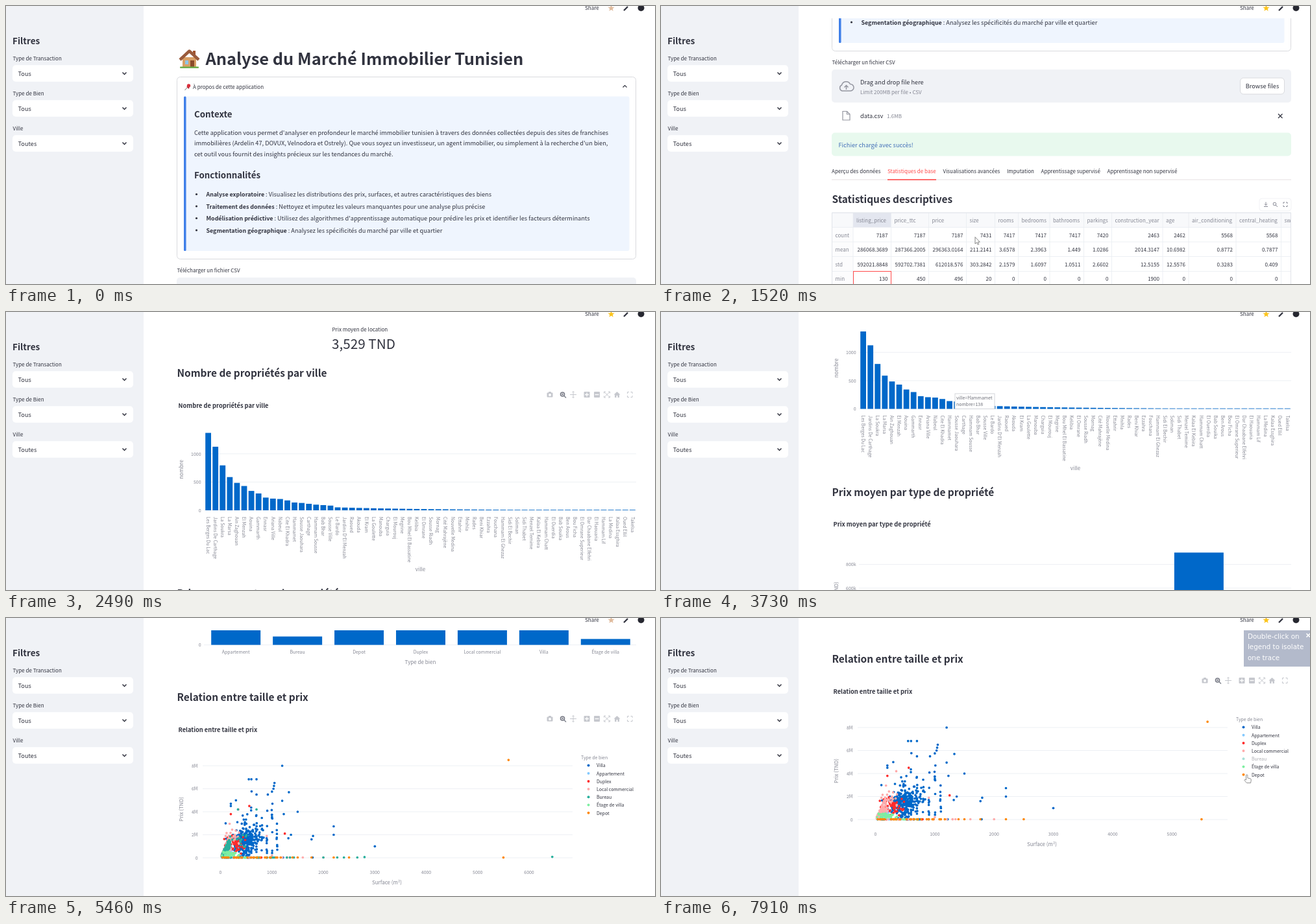
Animation of 1000x429 px, one loop 7990 ms. Source, as an HTML page:

```html
<!DOCTYPE html>
<html lang="fr">
<head>
<meta charset="utf-8">
<title>Analyse immobilière</title>
<style>
html, body { margin: 0; width: 100%; height: 100%; overflow: hidden; background: #fff; }
svg { display: block; width: 1000px; height: 429px; }
text { font-family: "Noto Sans CJK JP", "Noto Sans CJK SC", "Noto Sans CJK KR", "Noto Sans CJK", "Open Sans", sans-serif; white-space: pre; }
.b { font-weight: 700; }
.m { text-anchor: middle; }
.e { text-anchor: end; }
</style>
</head>
<body>
<svg id="stage" viewBox="0 0 1000 429"></svg>
<script>
const LOOP = 7990;
const INK = '#31333f', GREY = '#868894', PALE = '#f0f2f6', BLUE = '#0068c9', RED = '#ff4b4b';
const BODY = 9.21, LABEL = 8.06, TICK = 6.94, HEAD = 15.42, TITLE = 9.28;

// y is the middle of the capital letters
const text = (x, y, s, size = BODY, fill = INK, cls = '', more = '') =>
  `<text x="${x}" y="${(y + size * .36 + .3).toFixed(2)}" font-size="${size}" fill="${fill}" class="${cls}" ${more}>${s}</text>`;
const rect = (x, y, w, h, fill, rx = 0, stroke = 'none') =>
  `<rect x="${x}" y="${y}" width="${w}" height="${h}" fill="${fill}" rx="${rx}" stroke="${stroke}"/>`;
const line = (d, stroke = INK, w = 1, more = '') =>
  `<path d="${d}" fill="none" stroke="${stroke}" stroke-width="${w}" ${more}/>`;
const dot = (x, y, r, fill, more = '') => `<circle cx="${x}" cy="${y}" r="${r}" fill="${fill}" ${more}/>`;
const group = (y, body, id = '') => `<g id="${id}" transform="translate(0 ${y})">${body}</g>`;
const turned = (x, y, s, size, angle, cls = 'm') =>
  `<g transform="translate(${x} ${y}) rotate(${angle})">${text(0, 0, s, size, GREY, cls)}</g>`;
const grid = (x1, x2, y) => line(`M${x1} ${y}H${x2}`, '#e9ecf1', .8);

let seed = 7;
const rnd = () => (seed = seed * 16807 % 2147483647) / 2147483647;
const gauss = () => rnd() + rnd() + rnd() + rnd() - 2;
const times = (n, f) => Array.from({ length: n }, (_, i) => f(i));

function modebar(y, id = '') {
  const c = '#c6c8ce';
  const box = (x, sign) => rect(x - 4.5, -4.5, 9, 9, c, 1) + line(sign, '#fff', 1.3);
  return group(y,
    rect(833.5, -3, 9, 7, c, 1) + rect(836, -4.5, 4, 2, c) + dot(838, .5, 2, '#fff') +
    dot(857.5, -.5, 3, 'none', 'stroke="#777a85" stroke-width="1.6"') +
    line('M856 -.5h3M857.5 -2v3M860 2l3 3', '#777a85', 1.2) +
    line('M869 0h10M874 -5v10M872.5 -3.5l1.5 -1.5 1.5 1.5M872.5 3.5l1.5 1.5 1.5 -1.5', c) +
    box(895, 'M892 0h6M895 -3v6') + box(910.5, 'M907.5 0h6') +
    line('M922 -4l8 8M930 -4l-8 8M921.5 -2v-2.5h2.5M928 -4.5h2.5v2.5M921.5 2v2.5h2.5M928 4.5h2.5v-2.5', c) +
    `<path d="M936.5 0l5 -4.5 5 4.5h-1.5v4.5h-2.5v-3h-2v3H938V0z" fill="${c}"/>` +
    line('M957.5 -1.5v-2.5h2.5M962.5 -4h2.5v2.5M957.5 1.5V4h2.5M962.5 4h2.5V1.5', c), id);
}

function sidebar() {
  const select = (y, label, value) => text(10.5, y - 23, label, LABEL) +
    rect(10, y - 12.7, 186, 25.4, '#fff', 5) + text(18.5, y, value) +
    line(`M179.5 ${y - 1.5}l3 3 3 -3`, INK, 1.5);
  return rect(0, 0, 212, 429, PALE) + text(10, 53.5, 'Filtres', 13.5, INK, 'b') +
    select(104, 'Type de Transaction', 'Tous') + select(158, 'Type de Bien', 'Tous') +
    select(212, 'Ville', 'Toutes');
}

function header() {
  const star = times(10, i => {
    const a = i * Math.PI / 5, r = i % 2 ? 2.3 : 5.3;
    return `${932.5 + r * Math.sin(a)},${3.5 - r * Math.cos(a)}`;
  }).join(' ');
  return rect(212, 0, 788, 19, '#fff') + text(892, 3.2, 'Share', LABEL) +
    `<polygon id="star" points="${star}"/>` +
    line('M952 7l6 -6', INK, 2.3) + dot(978.5, 3, 5, '#262730');
}

function intro() {
  const item = (y, head, rest) => dot(293.5, y, 1.6, INK) +
    text(308.5, y, `<tspan class="b" font-size="8.9">${head}</tspan> : ${rest}`);
  const house = rect(272, 79, 21, 16, '#d9a066') + rect(288, 69, 4, 9, '#a0522d') +
    line('M268 83L282.5 69.5L297 83', '#9a5b3c', 4.5, 'stroke-linejoin="round"') +
    rect(276, 84, 5, 6, '#8ec5e8') + rect(284, 84, 6, 11, '#8a4b2a') + rect(268, 93.5, 29, 2.5, '#6fae4e', 1);
  const pin = line('M279 126l-3.5 4', '#777', 1) + line('M279 124l3 3', '#b3202c', 2) +
    dot(281.5, 123, 2.7, '#d8303c');
  return house + text(307.5, 82, 'Analyse du Marché Immobilier Tunisien', 25.4, INK, 'b') +
    rect(263.5, 109.5, 707, 281, '#fff', 5, '#d9dade') + pin +
    text(288, 125, 'À propos de cette application', LABEL) + line('M950.5 125.5l3 -3 3 3', INK, 1.2) +
    rect(274, 139.5, 686.5, 238.5, '#eff5fe', 3) + rect(274, 139.5, 3.5, 238.5, '#3f7fe8', 1.5) +
    text(290, 166.5, 'Contexte', 13.3, INK, 'b') +
    text(290, 195, "Cette application vous permet d'analyser en profondeur le marché immobilier tunisien à travers des données collectées depuis des sites de franchises") +
    text(290, 211.5, "immobilières (Ardelin 47, DOVUX, Velnodora et Ostrely). Que vous soyez un investisseur, un agent immobilier, ou simplement à la recherche d'un bien,") +
    text(290, 228, 'cet outil vous fournit des insights précieux sur les tendances du marché.') +
    text(290, 260.5, 'Fonctionnalités', 13.3, INK, 'b') +
    item(290.5, 'Analyse exploratoire', 'Visualisez les distributions des prix, surfaces, et autres caractéristiques des biens') +
    item(309, 'Traitement des données', 'Nettoyez et imputez les valeurs manquantes pour une analyse plus précise') +
    item(327.5, 'Modélisation prédictive', "Utilisez des algorithmes d'apprentissage automatique pour prédire les prix et identifier les facteurs déterminants") +
    item(346, 'Segmentation géographique', 'Analysez les spécificités du marché par ville et quartier');
}

function uploader() {
  const tabs = [[263, 'Aperçu des données'], [349, 'Statistiques de base'], [434.5, 'Visualisations avancées'],
    [533, 'Imputation'], [585.5, 'Apprentissage supervisé'], [687.5, 'Apprentissage non supervisé']];
  return text(263.5, 87, 'Télécharger un fichier CSV', LABEL) + rect(263, 98, 708, 51, PALE, 5) +
    line('M279 131a4.8 4.8 0 0 1 -.5 -9a7 7 0 0 1 13 -1.5a5 5 0 0 1 .5 10.5z', '#9496a0', 1.5) +
    line('M285.5 129v-6M282.5 125.5l3 -3 3 3', '#9496a0', 1.5) +
    text(307, 117, 'Drag and drop file here') + text(307, 133, 'Limit 200MB per file • CSV', LABEL, GREY) +
    rect(892.5, 111, 68, 25, '#fff', 5, '#d9dade') + text(926.5, 123.5, 'Browse files', BODY, INK, 'm') +
    line('M280 162.5h6.5l4.5 4.5v9h-11zM286.5 162.5v4.5h4.5', '#9496a0', 1.2) +
    text(307, 169.5, 'data.csv') + text(348, 169.5, '1.6MB', LABEL, GREY) +
    line('M951 166.5l6.5 6.5M957.5 166.5l-6.5 6.5', INK, 1.2) +
    rect(263, 195.5, 708, 36, '#e8f9ee', 5) + text(273.5, 214, 'Fichier chargé avec succès!', BODY, '#4470b8') +
    tabs.map(([x, s], i) => text(x, 255, s, LABEL, INK, '', `id="tab${i}"`)).join('') +
    line('M263 268H971', '#e6dfe2', 1) + rect(349, 267.2, 75, 1.6, RED).replace('<rect', '<rect id="mark"');
}

function stats() {
  const cols = [
    [296, 'listing_price', '7187 286068.3689 592021.8848 130'], [354.5, 'price_ttc', '7187 287366.2005 592702.7381 450'],
    [412.5, 'price', '7187 296363.0164 612018.576 496'], [470.5, 'size', '7431 211.2141 303.2842 20'],
    [514.5, 'rooms', '7417 3.6578 2.1579 0'], [550.5, 'bedrooms', '7417 2.3963 1.6097 0'],
    [599, 'bathrooms', '7417 1.449 1.0511 0'], [651.5, 'parkings', '7420 1.0286 2.6602 0'],
    [694.5, 'construction_year', '2463 2014.3147 12.5155 1900'], [773, 'age', '2462 10.6982 12.5576 0'],
    [813, 'air_conditioning', '5568 0.8772 0.3283 0'], [886, 'central_heating', '5568 0.7877 0.409 0'], [955.5, 'sw', '']];
  const rowY = i => 353.5 + 22.5 * i;
  let s = text(263.5, 298, 'Statistiques descriptives', HEAD, INK, 'b') +
    rect(263, 319, 708, 22.5, '#f8f9fb') + rect(263, 341, 33, 90, '#fcfcfd') + rect(296, 319, 58.5, 22.5, '#e3e6ef');
  for (const y of [319, 341.5, 364, 386.5, 409.5, 432]) s += grid(263, 971, y);
  cols.forEach(([x, name, vals], i) => {
    s += line(`M${x} 319V432`, '#e9ecf1', .8) + text(x + 5, 330.5, name, LABEL, GREY);
    if (vals) vals.split(' ').forEach((v, r) => s += text(cols[i + 1][0] - 5, rowY(r), v, LABEL, INK, 'e'));
  });
  ['count', 'mean', 'std', 'min'].forEach((v, r) => s += text(268.5, rowY(r), v, LABEL, GREY));
  return s + line('M263.5 432V319H970.5V432', '#e1e4ea') + rect(296.5, 409.5, 58, 22.5, 'none', 0, RED) +
    rect(922, 297, 49, 19, '#fff', 4, '#f1f2f5') +
    line('M932 302.5v5M930 305.5l2 2 2 -2M929 309.5h6', GREY) +
    dot(945.5, 305.5, 2.3, 'none', `stroke="${GREY}"`) + line('M947 307l3 3', GREY) +
    line('M959 305v-2h2M963 303h2v2M959 307.5v2h2M963 309.5h2v-2', GREY);
}

function cities() {
  const names = "Les Berges Du Lac,Jardins De Carthage,La Soukra,La Marsa,Ain Zaghouan,El Menzah,Aouina,Gammarth,Ennasr,Ariana Ville,Nabeul,Cite El Khadra,Hammamet,Sousse Jaouhara,Carthage,Hammam Sousse,Bab Bhar,Sousse Ville,Le Bardo,Jardins D'El Menzah,Raoued,Akouda,El Kram,La Goulette,Manouba,Charguia,El Mourouj,Megrine,Bou Mhel El Bassatine,Kelibia,El Omrane,Sousse Riadh,Mornag,Cité Mahrajène,Nouvelle Medina,Ettahrir,Mnihla,Rades,Beni Khiar,Ezzahra,Fouchana,Hammam El Ghezaz,Sidi El Bechir,Soliman,Sidi Thabet,Menzel Temime,Kalaa El Kebira,Hammam Chatt,El Ouerdia,Bab Souika,Ben Arous,Bou Ficha,El Omrane Superieur,Dar Chaabane Elfehri,El Haouaria,Hammam Lif,La Medina,Kalaa Essghira,Oued Ellil,Takelsa".split(',');
  const top = [1370, 1125, 795, 588, 485, 430, 343, 298, 225, 207, 200, 175, 138, 130, 115, 100, 92, 83];
  let s = text(502.5, 26.5, 'Prix moyen de location', LABEL) + text(502, 49, '3,529 TND', 20.7) +
    text(263.5, 94.5, 'Nombre de propriétés par ville', HEAD, INK, 'b') + modebar(127.5) +
    text(265.5, 144.5, 'Nombre de propriétés par ville', TITLE, INK, 'b');
  [0, 500, 1000].forEach(v => {
    const y = 306 - v * .0872;
    s += grid(305, 971, y) + text(300.5, y, v, TICK, GREY, 'e');
  });
  names.forEach((name, i) => {
    const x = 311.6 + i * 11.08, h = Math.max(.8, (top[i] || 52 * Math.exp((18 - i) / 14)) * .0872);
    s += rect(x - 4.4, 306 - h, 8.8, h, BLUE) + turned(x, 316, name, TICK, 90, '');
  });
  return s + turned(270, 243, 'nombre', LABEL, -90) + text(638.5, 397, 'ville', LABEL, GREY, 'm') +
    `<g id="tip">${rect(453, 282.5, 61, 23.5, '#fff', 0, '#d3d5da')}${text(455, 289, 'ville=Hammamet', TICK, '#6d6f78')}${text(455, 299, 'nombre=138', TICK, '#6d6f78')}</g>`;
}

function types() {
  const bars = [['Appartement', 300], ['Bureau', 71], ['Depot', 450], ['Duplex', 550], ['Local commercial', 400], ['Villa', 900], ['Étage de villa', 50]];
  let s = text(263.5, 278, 'Prix moyen par type de propriété', HEAD, INK, 'b') + modebar(311, 'bar2') +
    text(265.5, 327.5, 'Prix moyen par type de propriété', TITLE, INK, 'b');
  for (let v = 0; v <= 800; v += 200) {
    const y = 535.5 - v * .1825;
    s += grid(305, 971, y) + text(300.5, y, v ? v + 'k' : '0', TICK, GREY, 'e');
  }
  bars.forEach(([name, v], i) => {
    const x = 354.2 + i * 94.93, h = v * .1825;
    s += rect(x - 38, 535.5 - h, 76, h, BLUE) + text(x, 546.5, name, TICK, GREY, 'm');
  });
  return s + turned(270, 449, 'Prix moyen (TND)', LABEL, -90) + text(638.5, 562, 'Type de bien', LABEL, GREY, 'm');
}

// Scatter traces: points are [surface, price in millions]
const floor = (n, max) => times(n, () => [20 + rnd() * max, .02]);
const rising = (n, max, slope) => times(n, () => { const x = 20 + rnd() * max; return [x, x * slope * (.4 + rnd())]; });
const cloud = (n, x, dx, y, dy) => times(n, () => [x + dx * gauss(), Math.max(.1, y + dy * gauss())]);
const onBottom = xs => xs.map(x => [x, .03]);
const traces = [
  { name: 'Villa', color: BLUE, dull: '#7b7b82', pts: [
    ...cloud(190, 470, 150, 1.3, .8), ...cloud(80, 500, 270, 1.9, 1.4),
    ...[500, 600, 700, 800, 900, 1000, 1100].flatMap(x => times(9, () => [x + 8 * gauss(), .4 + 4 * rnd() ** 1.6])),
    ...floor(14, 1300), [1200, 8], [550, 6.83], [600, 6.83], [700, 6.83], [605, 5.77], [1050, 6.5], [1040, 6.25],
    [1030, 6], [1000, 5.75], [920, 5.5], [700, 5.5], [1330, 5.7], [1200, 4.95], [1500, 4], [1230, 3.8], [1010, 4.7],
    [300, 5], [200, 4.7], [200, 4.5], [2200, 2.73], [2200, 2], [1800, 1.9], [1770, 1.6], [1370, 2], [1320, 1.7], [3000, 1], [1790, .02], [100, 3]] },
  { name: 'Appartement', color: '#83c9ff', dull: '#b5c7dd', pts: [...rising(60, 200, .004), ...floor(8, 600)] },
  { name: 'Duplex', color: '#ff2b2b', dull: '#857277', pts: [...cloud(60, 270, 140, 1.25, .75), ...floor(6, 800), [560, 4.5], [200, 3.8], [1250, 2.1]] },
  { name: 'Local commercial', color: '#ffabab', dull: '#c9a3ad', pts: [...rising(85, 180, .0085), ...cloud(16, 220, 110, 2, .8), ...floor(12, 1300), [900, 1.9], [350, 4.2], [1000, .2], ...onBottom([1350, 1600, 2000])] },
  { name: 'Bureau', color: '#29b09d', dull: '#94a9c4', pts: [...rising(75, 170, .0075), ...cloud(12, 400, 130, 1.4, .6), ...floor(22, 1500), [340, 4.2], [700, 4.2], ...onBottom([2000, 2270, 2400, 2660]), [2800, .06], [6450, .08]] },
  { name: 'Étage de villa', color: '#7defa1', dull: '#e3e8ea', pts: [...cloud(45, 170, 120, .33, .22), ...floor(8, 700)] },
  { name: 'Depot', color: '#ff8700', dull: '#82868f', pts: [...floor(30, 1150), ...onBottom([1400, 1500, 1770, 2200, 2500]), [5500, .02], [5600, 8.5]] }];

function scatter() {
  let s = text(263.5, 63.5, 'Relation entre taille et prix', HEAD, INK, 'b') + modebar(96.5) +
    text(265.5, 113.5, 'Relation entre taille et prix', TITLE, INK, 'b');
  for (let v = 0; v <= 8; v += 2) {
    const y = 311 - v * 17.75;
    s += grid(303, 873, y) + text(295.5, y, v ? v + 'M' : '0', TICK, GREY, 'e');
  }
  s += times(7, i => text(0, 333, i * 1000, TICK, GREY, 'm', `id="x${i}"`)).join('');
  traces.forEach((t, i) => {
    for (const id of ['near', 'far'])
      s += `<path id="${id}${i}" fill="none" stroke-width="3.7" stroke-linecap="round"/>`;
  });
  traces.forEach((t, i) => {
    const y = 168.5 + i * 12.2;
    s += `<g id="key${i}">${dot(897.5, y, 2, t.color)}${text(910, y, t.name, TICK)}</g>`;
  });
  return s + text(886, 156.5, 'Type de bien', TICK, GREY) +
    turned(269.5, 236, 'Prix (TND)', LABEL, -90) + text(587, 348.5, 'Surface (m²)', LABEL, GREY, 'm');
}

const note = ['Double-click on', 'legend to isolate', 'one trace'].map((s, i) =>
  text(904, 28 + i * 16.3, s, 10.35, '#fff', '', 'style="font-family:\'DejaVu Sans\',sans-serif"')).join('');

document.getElementById('stage').innerHTML =
  group(0, group(0, intro()) + group(321, uploader()) + group(321, stats(), 'stats') +
    `<g id="charts">${group(600, cities())}${group(756.5, types())}${group(1309.5, scatter())}</g>`, 'page') +
  header() + sidebar() +
  `<g id="note">${rect(898, 19, 102, 56, '#b3bacb')}${note}${line('M994.5 24l5.5 5.5M1000 24l-5.5 5.5', '#fff', 1.6)}</g>` +
  `<path id="arrow" d="M0 0V10.5L2.5 8.3L4.2 11.8L5.8 11L4.2 7.7H7.3Z" fill="#fff" stroke="#666" stroke-width=".8"/>` +
  `<path id="hand" d="M-.5 8V1a1.2 1.2 0 0 1 2.4 0V5L6 5.8Q7.5 6.2 7.3 8L6.6 12.5H.5L-3 8.5Q-3 7 -1.8 7.3Z" fill="#fff" stroke="#777" stroke-width=".8"/>`;

const $ = id => document.getElementById(id);
const set = (id, attr, v) => $(id).setAttribute(attr, v);
const show = (id, on) => set(id, 'visibility', on ? 'visible' : 'hidden');
const within = (t, a, b) => t >= a && t < b;

// Eased value between keys [time, a, b, ...]
function at(keys, t) {
  const i = keys.findIndex(k => k[0] > t);
  if (i < 1) return keys[i ? keys.length - 1 : 0].slice(1);
  const [a, b] = [keys[i - 1], keys[i]], p = (t - a[0]) / (b[0] - a[0]), e = p * p * (3 - 2 * p);
  return a.slice(1).map((v, j) => v + (b[j + 1] - v) * e);
}

const scroll = [[130, 0], [1250, 321], [1930, 321], [2420, 600], [2640, 600], [3440, 756.5], [3820, 756.5],
  [4330, 962.5], [5220, 962.5], [5430, 1250.5], [5540, 1250.5], [6000, 1309.5]];
const statsMouse = [[1150, 620, 300], [1420, 484, 356.5], [1600, 484, 356.5], [1830, 478, 256], [1900, 478, 256]];
const plotMouse = [[6100, 700, 290], [6580, 978, 223], [6800, 978, 223], [7250, 899, 217], [7790, 899, 217], [7880, 902, 242]];

function spread(scale, hidden) {
  traces.forEach((t, i) => {
    const d = keep => t.pts.filter(keep).map(([x, y]) =>
      `M${(330.5 + x * scale).toFixed(1)} ${(311 - y * 17.75).toFixed(1)}h.01`).join('');
    set('near' + i, 'd', d(p => p[0] < 2900));
    set('far' + i, 'd', d(p => p[0] >= 2900));
    for (const id of ['near', 'far']) show(id + i, i !== hidden);
    set('key' + i, 'opacity', i === hidden ? .4 : 1);
  });
  times(7, i => {
    const x = 330.5 + i * 1000 * scale;
    set('x' + i, 'x', x);
    $('x' + i).style.display = x < 873 ? '' : 'none';
  });
}

let wasOff;
function draw(now) {
  const t = now % LOOP, charts = t >= 1880, off = t >= 7800, dull = within(t, 6050, 6940);
  set('page', 'transform', `translate(0 ${-at(scroll, t)[0]})`);
  $('stats').style.display = charts ? 'none' : '';
  $('charts').style.display = charts ? '' : 'none';
  set('tab1', 'fill', charts ? INK : RED);
  set('tab2', 'fill', charts ? RED : INK);
  set('mark', 'x', charts ? 434.5 : 349);
  set('mark', 'width', charts ? 88.5 : 75);
  set('star', 'fill', t < 100 || within(t, 3900, 5700) ? '#e0bb9d' : '#fcc41c');
  $('tip').style.display = within(t, 3480, 3825) ? '' : 'none';
  $('bar2').style.display = within(t, 4400, 5240) ? '' : 'none';
  if (off !== wasOff) spread((wasOff = off) ? .09135 : .07925, off ? 4 : -1);
  traces.forEach((tr, i) => {
    set('near' + i, 'stroke', tr.color);
    set('far' + i, 'stroke', dull ? '#85868c' : tr.color);
    $('key' + i).firstChild.setAttribute('fill', dull ? tr.dull : tr.color);
  });
  set('note', 'opacity', Math.min(1, Math.max(0, (t - 7800) / 90)));
  const late = t > 5000, [x, y] = at(late ? plotMouse : statsMouse, t), hand = t > 7200;
  for (const id of ['arrow', 'hand']) set(id, 'transform', `translate(${x} ${y})`);
  show('arrow', !hand && (late ? t >= 6100 : within(t, 1150, 1900)));
  show('hand', hand);
  requestAnimationFrame(draw);
}
requestAnimationFrame(draw);
</script>
</body>
</html>
```
